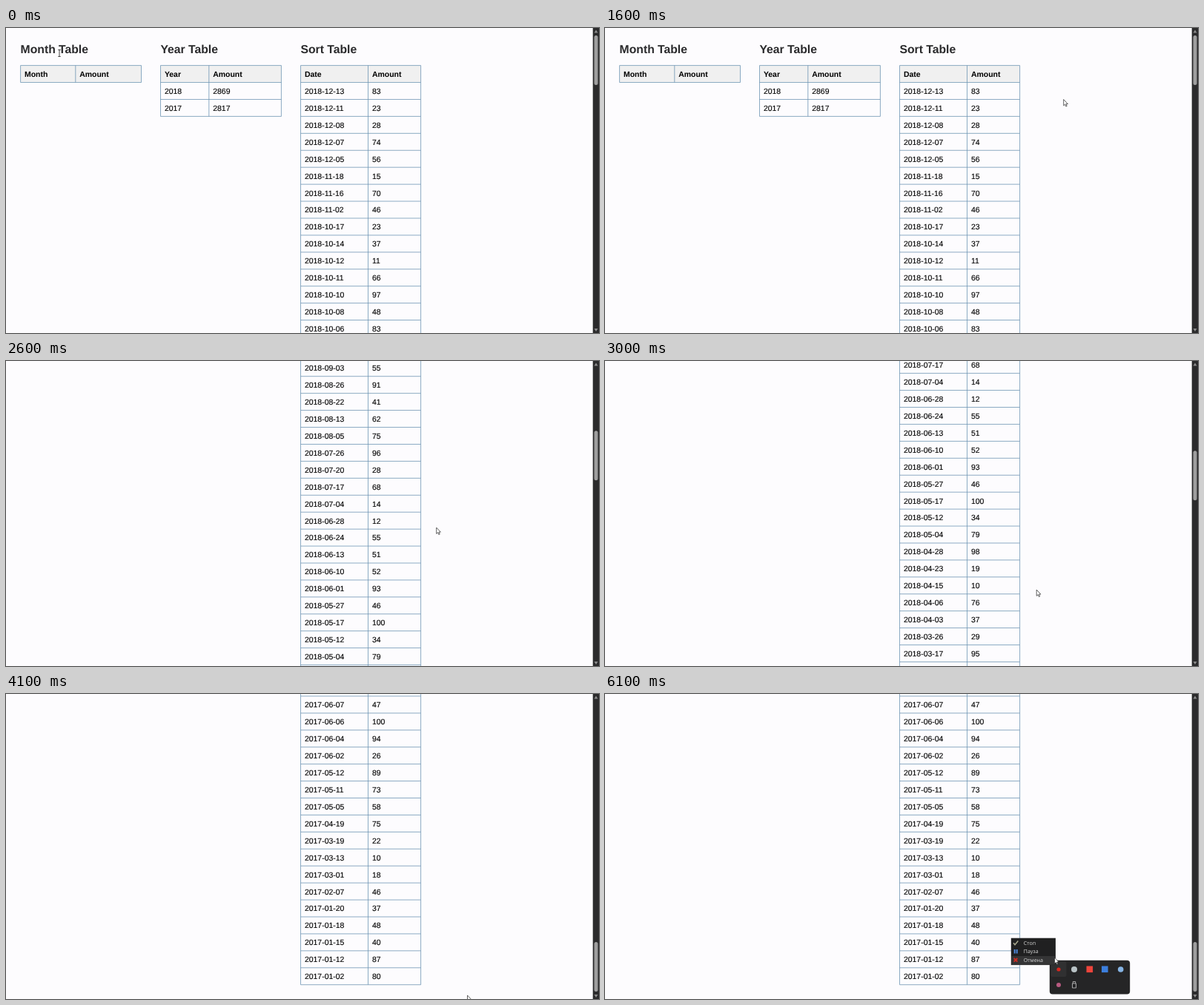
Recreate the animation shown at these times as an HTML page. Size 800 by 412 pixels, loop 6200 ms.

```html
<!DOCTYPE html>
<html lang="en">
<head>
<meta charset="utf-8">
<title>Month, year and sort tables</title>
<style>
  html, body { margin: 0; width: 100%; height: 100%; overflow: hidden; background: #fdfcfe; }
  svg { display: block; }
  text { font: 10.48px Arial, "Liberation Sans", sans-serif; text-rendering: geometricPrecision; }
  #page text { stroke: #000; stroke-width: .12; }
  #page .title { font-size: 15.72px; font-weight: bold; fill: #2a2a2c; stroke: none; }
  #page .head { font-weight: bold; stroke: none; }
  #menu text { font: 7px "Open Sans", "Noto Sans", sans-serif; fill: #dcdcdc; }
</style>
</head>
<body>
<svg width="800" height="412" viewBox="0 0 800 412">
  <g id="page"></g>

  <rect x="791.7" width="8.3" height="412" fill="#2b2b2c"/>
  <path d="M793.5 6.5L796 2.5L798.5 6.5ZM793.5 406L796 410L798.5 406Z" fill="#8c8c8c"/>
  <rect id="thumb" x="793.5" width="5" height="67" rx="2.5" fill="#9f9f9f"/>

  <g id="tray">
    <rect x="599.8" y="359.7" width="108.4" height="45.8" rx="4" fill="#252526"/>
    <rect id="tile" x="601.5" y="361.5" width="21" height="20.5" rx="2" fill="#303031"/>
    <circle cx="612" cy="372" r="2.6" fill="#d8271f"/>
    <circle cx="633" cy="372" r="4" fill="#b9c3c6"/>
    <rect x="649.5" y="367.5" width="8.6" height="8.6" fill="#ee443b"/>
    <rect x="670" y="367.5" width="8.6" height="8.6" fill="#3c7fdd"/>
    <circle cx="695.7" cy="372" r="3.8" fill="#86b4e4"/>
    <circle cx="612" cy="393" r="3" fill="#b85a80"/>
    <path d="M631.3 391V388.5H634.7V391M630.5 391H635.5V397H630.5Z" fill="none" stroke="#c8c8c8" stroke-width=".8"/>
  </g>

  <g id="menu">
    <rect x="547.8" y="329.7" width="60.1" height="36.4" fill="#202021"/>
    <rect x="548.3" y="354" width="59.2" height="11.7" fill="#353536"/>
    <path d="M551 336.3L553 338.7L557.3 333.5" fill="none" stroke="#a5a58c" stroke-width="1.6"/>
    <path d="M552.7 345V350.5M555.7 345V350.5" stroke="#4e86d8" stroke-width="2"/>
    <path d="M551.7 357L556.3 361.6M556.3 357L551.7 361.6" stroke="#d02c24" stroke-width="2"/>
    <text x="564.8" y="338.7">Стоп</text>
    <text x="564.8" y="350.4">Пауза</text>
    <text x="564.8" y="362">Отмена</text>
  </g>

  <path id="arrow" d="M0 0V8.3L1.9 6.6L3.2 9.5L4.5 8.9L3.2 6.1H5.7Z" fill="#fff" stroke="#222" stroke-width=".7"/>
  <path id="beam" d="M-1.7 -4.5H1.7M0 -4.5V4.5M-1.7 4.5H1.7" fill="none" stroke="#333" stroke-width=".9"/>
</svg>

<script>
const LOOP = 6200, STEP = 100, ROW = 22.93, TOP = 50.6, MAX_SCROLL = 1973.8;
const DAY = 864e5, PASSING_ROWS = 68;
const $ = id => document.getElementById(id);

// "year-month day:amount day:amount ..."
const rowsOf = line => {
  const [month, ...days] = line.split(' ');
  return days.map(d => d.split(':')).map(([day, amount]) => [`${month}-${day}`, amount]);
};

const random = n => {
  const v = Math.sin(n * 12.9898) * 43758.5453;
  return v - Math.floor(v);
};

// Rows only seen while scrolling: about one a week, amounts from 10 to 100
const passing = Array.from({ length: PASSING_ROWS }, (_, i) => {
  const date = new Date(Date.UTC(2018, 9, 5) - 7.1 * DAY * (i + random(i + 1)));
  return [date.toISOString().slice(0, 10), 10 + Math.floor(91 * random(i + 100))];
});

const sales = [
  ...[
    '2018-12 13:83 11:23 08:28 07:74 05:56',
    '2018-11 18:15 16:70 02:46',
    '2018-10 17:23 14:37 12:11 11:66 10:97 08:48 06:83'
  ].flatMap(rowsOf),
  ...passing,
  ...[
    '2017-06 07:47 06:100 04:94 02:26',
    '2017-05 12:89 11:73 05:58',
    '2017-04 19:75',
    '2017-03 19:22 13:10 01:18',
    '2017-02 07:46',
    '2017-01 20:37 18:48 15:40 12:87 02:80'
  ].flatMap(rowsOf)
];

function table(title, [left, mid, right], head, rows) {
  const bottom = TOP + ROW * (rows.length + 1);
  let lines = `M${left} ${bottom}H${right}`, cells = '';
  [head, ...rows].forEach((row, i) => {
    const y = TOP + ROW * i;
    lines += `M${left} ${y}H${right}`;
    row.forEach((value, c) => {
      const x = (c ? mid : left) + 5.4;
      cells += `<text x="${x}" y="${y + 15.4}"${i ? '' : ' class="head"'}>${value}</text>`;
    });
  });
  for (const x of [left, mid, right]) lines += `M${x} ${TOP}V${bottom}`;
  return `<text class="title" x="${left}" y="34">${title}</text>
    <rect x="${left}" y="${TOP}" width="${right - left}" height="${ROW}" fill="#f0f0f0"/>
    <path d="${lines}" fill="none" stroke="#6f96b4" stroke-width=".8"/>${cells}`;
}

$('page').innerHTML =
  table('Month Table', [19.6, 93.8, 182.5], ['Month', 'Amount'], []) +
  table('Year Table', [208.5, 273.8, 371.4], ['Year', 'Amount'], [[2018, 2869], [2017, 2817]]) +
  table('Sort Table', [397.5, 488.5, 559.6], ['Date', 'Amount'], sales);

// legs: [start, end, ...goal]; the value rests between legs
const scrollLegs = [[2000, 2600, 511.4], [2600, 3000, 676], [3000, 3500, 1211.5], [3500, 4100, MAX_SCROLL]];
const mouseLegs = [
  [0, 500, 298, 62], [600, 900, 448, 131], [1000, 1600, 618.7, 96.5],
  [2000, 2600, 580.7, 225], [2600, 3000, 582.2, 309], [3000, 3500, 586.3, 339.2],
  [3500, 4100, 622.5, 407], [4100, 4600, 645.5, 373.5], [4800, 4900, 652, 420],
  [5300, 5800, 608, 366], [6000, 6100, 606.5, 356]
];

const travel = (from, legs, t) => legs.reduce((pos, [start, end, ...goal]) => {
  const p = Math.min(1, Math.max(0, (t - start) / (end - start)));
  return pos.map((v, i) => v + (goal[i] - v) * p);
}, from);

const show = (id, on) => $(id).setAttribute('visibility', on ? 'visible' : 'hidden');
const move = (id, x, y) => $(id).setAttribute('transform', `translate(${x} ${y})`);

function draw() {
  const t = Math.floor(performance.now() % LOOP / STEP) * STEP;
  const [scroll] = travel([0], scrollLegs, t);
  const mouse = travel([72, 34], mouseLegs, t);
  move('page', 0, -scroll);
  $('thumb').setAttribute('y', 10 + 325 * scroll / MAX_SCROLL);
  move('arrow', ...mouse);
  move('beam', ...mouse);
  show('arrow', t >= 100);
  show('beam', t < 100);
  show('tray', t >= 5200);
  show('tile', t >= 5800);
  show('menu', t >= 6100);
  requestAnimationFrame(draw);
}
draw();
</script>
</body>
</html>
```
